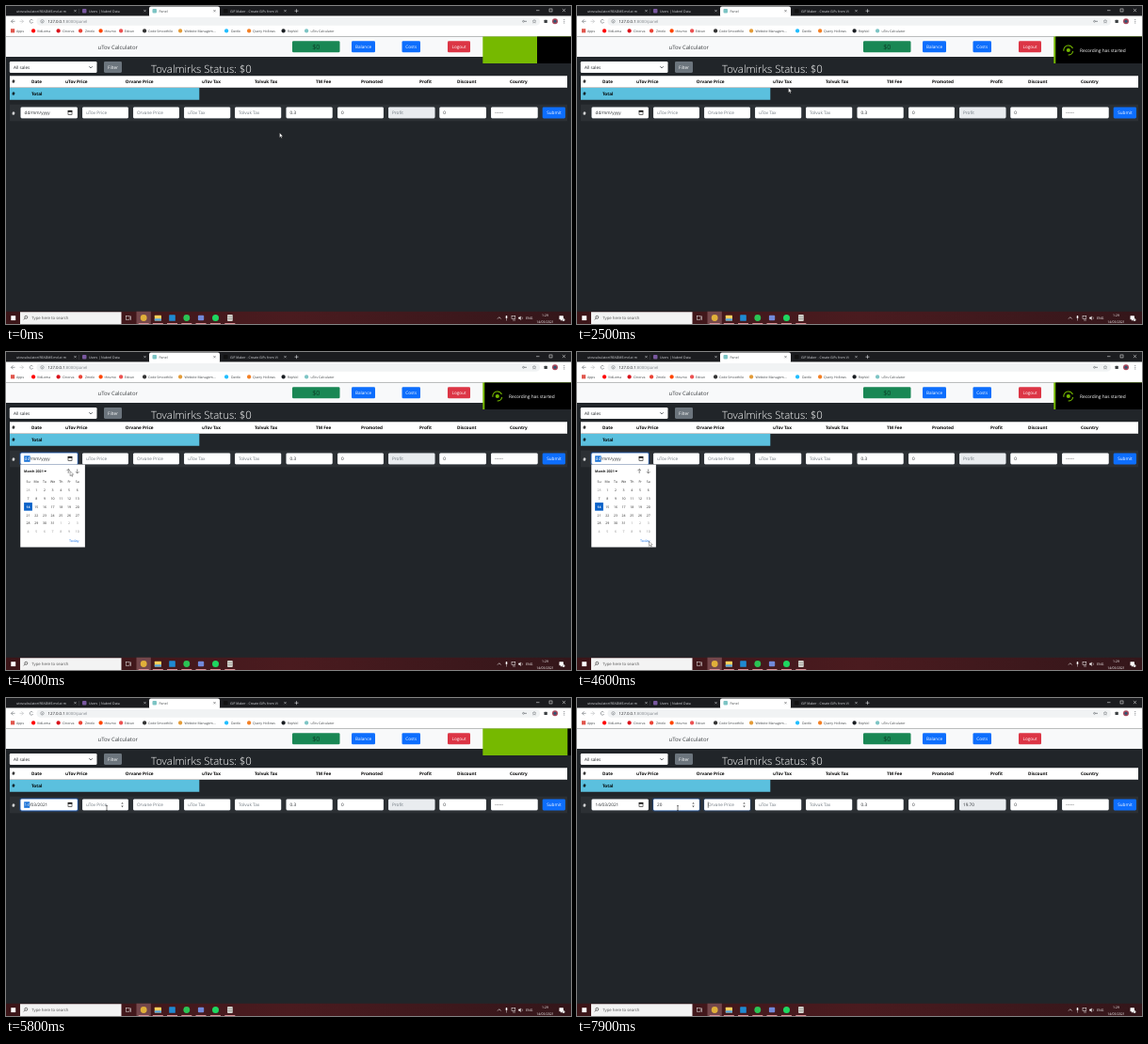
Recreate the animation shown at these times as an HTML page with a canvas. Size 600 px wide and 338 px high, loop 8 s.

```html
<!DOCTYPE html>
<html lang="en">
<head>
<meta charset="utf-8">
<title>Sales panel</title>
<style>
html, body { margin: 0; width: 100%; height: 100%; overflow: hidden; background: #212529; }
canvas { display: block; }
</style>
</head>
<body>
<canvas id="stage" width="600" height="338"></canvas>
<script>
const g = document.getElementById('stage').getContext('2d');
g.textRendering = 'geometricPrecision';

const LOOP = 8000, STEP = 100;
const INK = '#212529', BLUE = '#0d6efd', GREY = '#6c757d', PALE = '#dfe1e5', ICON = '#5f6368', LIME = '#76b900';
const PAGE_TOP = 32.5;
const clamp = v => Math.max(0, Math.min(1, v));
const lerp = (a, b, u) => a + (b - a) * u;
const smooth = u => u * u * (3 - 2 * u);
const easeOut = u => 1 - (1 - u) ** 2;
const span = (t, a, b) => clamp((t - a) / (b - a));

function box(x, y, x2, y2, fill, r = 0) {
  g.fillStyle = fill;
  g.beginPath();
  g.roundRect(x, y, x2 - x, y2 - y, r);
  g.fill();
}
function disc(x, y, r, fill) {
  g.fillStyle = fill;
  g.beginPath();
  g.arc(x, y, r, 0, 7);
  g.fill();
}
function ring(x, y, r, color, w = .6, from = 0, to = Math.PI * 2) {
  g.strokeStyle = color;
  g.lineWidth = w;
  g.beginPath();
  g.arc(x, y, r, from, to);
  g.stroke();
}
function line(color, w, ...p) {
  g.strokeStyle = color;
  g.lineWidth = w;
  g.beginPath();
  for (let i = 0; i < p.length; i += 2) g.lineTo(p[i], p[i + 1]);
  g.stroke();
}
function poly(fill, ...p) {
  g.fillStyle = fill;
  g.beginPath();
  for (let i = 0; i < p.length; i += 2) g.lineTo(p[i], p[i + 1]);
  g.fill();
}
function text(s, x, y, color, size = 4.65, weight = 400, align = 'left') {
  g.font = `${weight} ${size}px "Open Sans", "Noto Sans", sans-serif`;
  g.textAlign = align;
  g.fillStyle = color;
  g.fillText(s, x, y);
}
function button(label, x, x2, y, fill) {
  box(x, y, x2, y + 11.9, fill, 1.3);
  text(label, (x + x2) / 2, y + 7.7, '#fff', 4.65, 400, 'center');
}
function cross(x, y, r, color) {
  line(color, .5, x - r, y - r, x + r, y + r);
  line(color, .5, x + r, y - r, x - r, y + r);
}

function tabs() {
  box(0, 0, 600, 11, '#1b1c1f');
  box(152, .5, 227, 12, '#fff', 2);
  const list = [
    [4, 'utovcalculator/README.md at m', '#1b1c1f', 70],
    [81, 'Users | Nubrel Data', '#79589f', 144],
    [155.5, 'Panel', '#7cc4c4', 218],
    [231, 'GIF Maker - Create GIFs from Vi', '#111', 293]
  ];
  for (const [x, s, color, end] of list) {
    const ink = s === 'Panel' ? '#3c4043' : PALE;
    box(x, 3, x + 4.5, 7.5, color, 1);
    g.save();
    g.beginPath();
    g.rect(x, 0, end - x, 11);
    g.clip();
    text(s, x + 7, 6.6, ink, 3.5);
    g.restore();
    cross(end + 3.5, 5.2, 1.1, ink);
  }
  line('#55575b', .4, 77.5, 3, 77.5, 8);
  line(PALE, .6, 306.5, 5.2, 310.5, 5.2);
  line(PALE, .6, 308.5, 3.2, 308.5, 7.2);
  line('#fff', .5, 563, 4.7, 566.5, 4.7);
  g.strokeRect(577, 3, 3, 3);
  cross(592.5, 4.6, 1.6, '#fff');
}

function toolbar() {
  box(0, 10.5, 600, PAGE_TOP, '#fff');
  line(ICON, .6, 7.5, 14.3, 5.5, 16.3, 7.5, 18.3);
  line(ICON, .6, 5.5, 16.3, 9.5, 16.3);
  line('#b5b8bb', .6, 16.5, 14.3, 18.5, 16.3, 16.5, 18.3);
  line('#b5b8bb', .6, 14.5, 16.3, 18.5, 16.3);
  ring(27, 16.3, 1.8, ICON, .6, .4, 5.7);
  box(32.5, 12, 567, 20.8, '#f1f3f4', 4.4);
  ring(38.5, 16.3, 1.7, ICON, .5);
  line(ICON, .5, 38.5, 16, 38.5, 17.3);
  text('127.0.0.1', 44.5, 17.9, '#202124', 4.3);
  text(':8000/panel', 44.5 + g.measureText('127.0.0.1').width, 17.9, '#80868b', 4.3);
  ring(549.5, 16.3, .9, ICON, .6);
  line(ICON, .7, 550.4, 16.3, 553, 16.3);
  const star = [];
  for (let i = 0; i < 11; i++) {
    const a = i * Math.PI / 5 - Math.PI / 2, r = i % 2 ? .9 : 2.1;
    star.push(561 + r * Math.cos(a), 16.4 + r * Math.sin(a));
  }
  line(ICON, .4, ...star);
  box(571.5, 14.8, 574.8, 18, '#3c4043', .5);
  disc(583, 16.3, 3, '#a8475a');
  disc(583, 16.3, 1.5, '#2b5876');
  for (const y of [14.6, 16.3, 18]) disc(592.8, y, .5, ICON);

  const marks = [
    ['Apps', 5, '#e0564c', 11], ['VidLoma', 27, '#f00', 33], ['Cinorva', 53.5, '#d8131c', 60],
    ['Zmelo', 77, '#ea4335', 84], ['thrumo', 98.5, '#ff4500', 104.5], ['Edvun', 120, '#ec5252', 126],
    ['Code Smoothilo', 145, '#333', 151], ['Website Managem...', 183, '#e39b38', 189.5],
    ['Dattlo', 232, '#20beff', 239], ['Query Hollows', 256, '#f48024', 262],
    ['RepVol', 292.5, '#1b1f23', 299], ['uTov Calculator', 317, '#7cc4c4', 323.5]
  ];
  for (const [s, x, color, tx] of marks) {
    box(x, 24.2, x + 4.2, 28.4, color, s === 'Apps' ? 0 : 2);
    text(s, tx, 27.7, '#3c4043', 3.5);
  }
}

function page() {
  box(0, PAGE_TOP, 600, 325, INK);
  box(0, PAGE_TOP, 600, 54, '#f8f9fa');
  text('uTov Calculator', 97.5, 45.5, '#3b3e41', 5.95);
  box(304, 37.3, 354.5, 49.2, '#198754', 1.3);
  text('$0', 329.2, 46.2, '#0b3d26', 7, 400, 'center');
  button('Balance', 367, 392, 37.3, BLUE);
  button('Costs', 420.5, 440, 37.3, BLUE);
  button('Logout', 469, 493, 37.3, '#dc3545');
  box(3.8, 59, 96.5, 71, '#fff', 1.3);
  text('All sales', 8, 66.8, INK);
  line('#343a40', .7, 88.2, 64.2, 90, 66, 91.8, 64.2);
  button('Filter', 104, 123, 59, GREY);
  text('Tovalmirks Status: $0', 154, 71.1, '#fff', 11.4, 300);

  box(4, 74.2, 596, 86.8, '#fff');
  const heads = [['Date', 27], ['uTov Price', 63], ['Orvane Price', 126.8], ['uTov Tax', 208],
    ['Tolvuk Tax', 264], ['TM Fee', 329], ['Promoted', 377], ['Profit', 439], ['Discount', 479], ['Country', 535]];
  for (const [s, x] of heads) text(s, x, 82.2, '#000', 4.65, 700);
  box(4, 87, 205.3, 99.8, '#5bc0de');
  text('Total', 27, 95.2, '#000', 4.65, 700);
  box(4, 104.8, 596, 122.2, '#2c3034');
  text('#', 6.3, 82.4, '#000', 5.2, 700);
  text('#', 6.3, 95.4, '#000', 5.2, 700);
  text('#', 6.3, 115.5, '#fff', 5.2, 700);
  button('Submit', 569.7, 594, 107.5, BLUE);
}

const FIELDS = [[15.5, 76], [81, 130], [135, 184], [189, 238.3], [243, 292.3], [297.5, 346.7],
  [352, 401], [406, 455.5], [460.3, 510], [515, 564.7]];
const TOP = 107.5, BOTTOM = 119.4, BASE = 115.3;

// Focus intervals for the first three fields
const FOCUS = [[3750, 5900], [5900, 7850], [7850, 9000]];
const glow = (t, [a, b]) => span(t, a, a + 150) * (1 - span(t, b, b + 150));

function spinner(x) {
  poly('#505050', x - 1.2, 112.6, x, 111, x + 1.2, 112.6);
  poly('#505050', x - 1.2, 114.6, x, 116.2, x + 1.2, 114.6);
}
function caret(x) {
  box(x, 110.4, x + .5, 116.8, '#111');
}

function form(t, mouse) {
  const typed = t < 7300 ? '' : t < 7400 ? '2' : '20';
  const profit = t < 7300 ? '' : t < 7500 ? '1.70' : '19.70';
  const values = ['', typed, '', '', '', '0.3', '0', profit, '0', '------'];
  const hints = ['', 'uTov Price', 'Orvane Price', 'uTov Tax', 'Tolvuk Tax', '', '', 'Profit', '', ''];

  FIELDS.forEach(([x, x2], i) => {
    const lit = FOCUS[i] ? glow(t, FOCUS[i]) : 0;
    if (lit) box(x - 1.25, TOP - 1.25, x2 + 1.25, BOTTOM + 1.25, `rgba(13,110,253,${lit * .35})`, 2.4);
    box(x, TOP, x2, BOTTOM, '#ced4da', 1.3);
    if (lit) box(x, TOP, x2, BOTTOM, `rgba(134,183,254,${lit})`, 1.3);
    box(x + .3, TOP + .3, x2 - .3, BOTTOM - .3, i === 7 ? '#e9ecef' : '#fff', 1);
    if (values[i] || hints[i]) text(values[i] || hints[i], x + 4, BASE, values[i] ? INK : GREY);
    const hover = mouse.y > TOP && mouse.y < BOTTOM && mouse.x > x && mouse.x < x2;
    const focused = FOCUS[i] && t >= FOCUS[i][0] && t < FOCUS[i][1];
    if (i && i < 9 && i !== 7 && (hover || focused)) spinner(x2 - 6.5);
  });

  dateText(t);
  if (t >= 6000 && t < 7850 && !(t >= 6500 && t < 7000)) {
    g.font = '400 4.65px "Open Sans", "Noto Sans", sans-serif';
    caret(85 + g.measureText(typed).width);
  }
  if (t >= 7850) caret(138.9);
}

function dateText(t) {
  const parts = t < 5000 ? ['dd', '/mm/yyyy'] : ['14', '/03/2021'];
  const marked = t >= 3800 && t < 5950;
  text(parts[0], 19.6, BASE, INK);
  const w = g.measureText(parts[0]).width;
  if (marked) {
    box(19.2, 110.3, 19.9 + w, 116.8, '#1a73d8');
    text(parts[0], 19.6, BASE, '#fff');
  }
  text(parts[1], 19.6 + w, BASE, INK);
  g.strokeStyle = '#111';
  g.lineWidth = .6;
  g.strokeRect(66, 111.6, 4, 4);
  box(65.8, 111, 70.2, 112.7, '#111');
}

function calendar(hot) {
  box(15.2, 119.4, 84, 207.6, '#a5a8ab');
  box(15.5, 119.7, 83.7, 207.3, '#fff');
  text('March 2021', 19, 128, '#111', 3.65, 700);
  poly('#111', 40.4, 126.1, 43, 126.1, 41.7, 127.8);
  for (const [x, d] of [[66.2, -1], [75.7, 1]]) {
    line('#444', .6, x, 126.7 - 2.2 * d, x, 126.7 + 2.2 * d);
    line('#444', .6, x - 1.8, 126.7 + .5 * d, x, 126.7 + 2.3 * d, x + 1.8, 126.7 + .5 * d);
  }
  const colX = c => 23.5 + c * 8.7;
  'Su Mo Tu We Th Fr Sa'.split(' ').forEach((s, c) => text(s, colX(c), 139, '#222', 3.5, 400, 'center'));
  for (let i = 0; i < 42; i++) {
    const x = colX(i % 7), y = 147 + Math.floor(i / 7) * 8.74;
    const inMonth = i > 0 && i < 32;
    if (i === 14) box(x - 4.4, y - 4.4, x + 4.4, y + 4.2, '#0b62c9');
    text(i === 0 ? 28 : i > 31 ? i - 31 : i, x, y + 1.3, i === 14 ? '#fff' : inMonth ? '#222' : '#8a8a8a',
      3.5, i === 14 ? 700 : 400, 'center');
  }
  text('Today', 67, 201.8, hot ? '#0b62c9' : '#1a73e8', 3.8);
}

function taskbar() {
  const shade = g.createLinearGradient(0, 0, 600, 0);
  shade.addColorStop(0, '#3b1518');
  shade.addColorStop(.5, '#4a1b1f');
  shade.addColorStop(1, '#34161a');
  box(0, 324.7, 600, 338, shade);
  box(5.3, 329.2, 10.2, 334.1, '#fff');
  box(15, 325.2, 122.5, 338, '#f3f3f3');
  ring(21.3, 330.8, 1.5, '#222', .6);
  line('#222', .6, 20.2, 331.9, 18.8, 333.4);
  text('Type here to search', 27.2, 333.4, '#555', 4.3);
  g.strokeStyle = '#eee';
  g.lineWidth = .5;
  g.strokeRect(127.5, 329.7, 3.6, 3.8);
  line('#eee', .6, 132.5, 329.5, 132.5, 333.8);
  box(138.5, 324.7, 153.8, 338, '#74474b');
  disc(146.2, 331.5, 3.4, '#e0b03a');
  box(157.8, 328.8, 165, 334.5, '#f7cf5c', .5);
  box(157.8, 332.2, 165, 334.5, '#5aa7df', .5);
  box(173.2, 328.3, 179.8, 334.8, '#1f8ad2', .6);
  disc(191.8, 331.5, 3.4, '#2bc454');
  box(203.9, 328.7, 210.2, 334.3, '#7289da', 1);
  disc(222.5, 331.5, 3.5, '#1ed760');
  box(235, 328, 240.8, 335, '#d3d3cd', 1);
  for (const y of [330.2, 332.6]) line('#77756f', .5, 235, y, 240.8, y);
  for (const x of [146.2, 161.3, 176.5, 191.8, 207, 222.4, 237.8]) box(x - 5.5, 337, x + 5.5, 338, '#d98f95');

  line('#fff', .6, 522, 332.5, 523.8, 330.7, 525.6, 332.5);
  box(530.7, 329, 532.3, 332.2, '#fff', .8);
  line('#fff', .5, 531.5, 332.5, 531.5, 334.4);
  g.strokeRect(537, 329.7, 3.8, 2.9);
  line('#fff', .5, 538, 334, 541, 334);
  poly('#fff', 544.2, 330.8, 545.4, 330.8, 546.6, 329.4, 546.6, 334, 545.4, 332.6, 544.2, 332.6);
  ring(546.6, 331.7, 1.8, '#fff', .4, -.9, .9);
  text('ENG', 552, 333.2, '#fff', 3.6);
  text('1:29', 572.5, 330.4, '#fff', 3.5, 400, 'center');
  text('14/03/2021', 572.5, 336.6, '#fff', 3.5, 400, 'center');
  box(587.5, 329.3, 592, 333.3, '#fff', .4);
  poly('#fff', 589, 333, 591, 333, 589, 334.8);
  disc(592, 333.5, 1.5, '#ddd');
}

function notice(t) {
  if (t >= 6150) return;
  const left = 506.3 + 93.7 * easeOut(span(t, 5850, 6150));
  const dark = t < 3000 ? 508.3 + 55.7 * (1 - span(t, 0, 400)) ** 2 : 508.3 + 91.7 * easeOut(span(t, 5600, 5850));
  box(left, PAGE_TOP, 600, 61, LIME);
  if (dark < 600) box(Math.max(left, dark), PAGE_TOP, 600, 61, '#000');
  g.globalAlpha = span(t, 250, 700) * (1 - span(t, 5400, 5650));
  const turn = span(t, 300, 1000) * Math.PI * 2;
  ring(521.8, 47, 5, LIME, 1.1, turn + 3, turn + 5.9);
  ring(521.8, 47, 5, LIME, 1.1, turn + .2, turn + 1.6);
  disc(521.8, 47, 2.1, LIME);
  text('Recording has started', 534, 49, '#fff', 4.8);
  g.globalAlpha = 1;
}

const PATH = [[0, 290.5, 134.8], [100, 290.5, 134.8], [800, 388.8, 49.5], [2000, 388.8, 49.5],
  [2900, 107, 114], [3000, 105, 114], [3500, 64.7, 112.8], [3800, 66.5, 112.8], [4600, 76.5, 201.2],
  [4800, 77, 200.7], [4950, 77, 200.7], [5100, 83.5, 189.5], [5800, 107, 117]];

function pointer(t) {
  const i = PATH.findIndex(p => p[0] > t);
  if (i < 0) return { x: 107, y: 117 };
  const [a, x, y] = PATH[i - 1], [b, x2, y2] = PATH[i];
  const u = smooth(span(t, a, b));
  return { x: lerp(x, x2, u), y: lerp(y, y2, u) };
}

function cursor({ x, y }, open) {
  const overText = !open && y > TOP && y < BOTTOM && FIELDS.some(([a, b], i) => i && i < 9 && x > a && x < b);
  if (overText) {
    line('#222', .6, x, y - 2.5, x, y + 2.5);
    line('#222', .5, x - 1, y - 2.5, x + 1, y - 2.5);
    line('#222', .5, x - 1, y + 2.5, x + 1, y + 2.5);
    return;
  }
  const shape = [0, 0, 0, 5.1, 1.2, 4, 2, 5.8, 2.8, 5.4, 2, 3.7, 3.6, 3.6, 0, 0]
    .map((v, i) => v + (i % 2 ? y : x));
  poly('#fff', ...shape);
  line('#111', .35, ...shape);
}

function draw(t) {
  const mouse = pointer(t), open = t >= 3800 && t < 5000;
  tabs();
  toolbar();
  page();
  form(t, mouse);
  if (open) calendar(t >= 4700);
  taskbar();
  notice(t);
  cursor(mouse, open);
}

const start = performance.now();
function tick() {
  const t = (performance.now() - start) % LOOP;
  draw(Math.floor(t / STEP) * STEP);
  requestAnimationFrame(tick);
}
tick();
</script>
</body>
</html>
```
